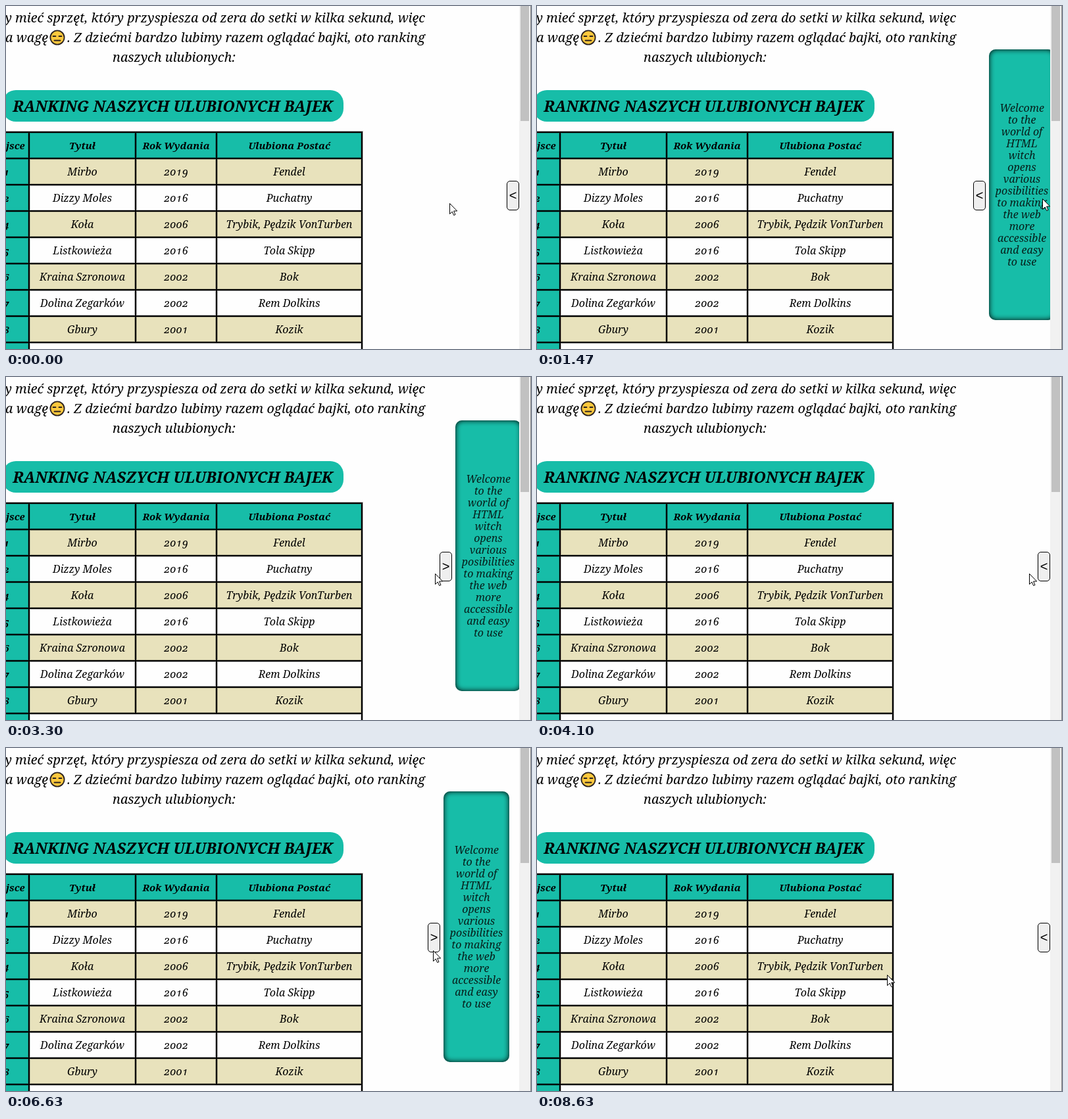
An HTML page that plays this animation: 798x522 px, repeating every 8700 ms.

```html
<!DOCTYPE html>
<html lang="pl">
<head>
<meta charset="utf-8">
<title>Ranking</title>
<style>
  html, body { margin: 0; width: 100%; height: 100%; overflow: hidden; background: #fefefe; }
  svg { display: block; width: 798px; height: 522px; }
  text { font: italic 16px "Noto Serif", serif; font-variant-numeric: oldstyle-nums; text-anchor: middle; }
  .intro { font-size: 19.8px; }
  .title { font-size: 23.4px; font-weight: 600; }
  .head { font-size: 14.9px; font-weight: 600; }
  .note { fill: #071f1b; }
  .sign { font: 20px "Liberation Sans", Arial, sans-serif; }
  .end { text-anchor: end; }
</style>
</head>
<body>
<svg viewBox="0 0 798 522">
  <defs>
    <clipPath id="panelShape"><rect width="100" height="412" rx="10"/></clipPath>
    <filter id="soft" x="-30%" y="-10%" width="160%" height="120%"><feGaussianBlur stdDeviation="4"/></filter>
  </defs>
  <rect width="798" height="522" fill="#fefefe"/>

  <text class="intro end" x="637" y="25">aby mieć sprzęt, który przyspiesza od zera do setki w kilka sekund, więc</text>
  <text class="intro end" x="64" y="55">a wagę</text>
  <g stroke="#2b2320" stroke-width="1.8" stroke-linecap="round">
    <circle cx="78" cy="48" r="10.6" fill="#ffc83d"/>
    <path d="M71.5 46h4M80.500 46h4M73.500 52.500h9" fill="none"/>
  </g>
  <text class="intro" x="365" y="55">. Z dziećmi bardzo lubimy razem oglądać bajki, oto ranking</text>
  <text class="intro" x="255.500" y="85">naszych ulubionych:</text>

  <rect x="-5" y="128" width="518" height="48" rx="20" fill="#17bda8"/>
  <text class="title" x="253.500" y="161">RANKING NASZYCH ULUBIONYCH BAJEK</text>

  <g id="table"></g>

  <g id="drawer">
    <g id="panel" transform="translate(24 66)" clip-path="url(#panelShape)">
      <rect width="100" height="412" fill="#17bda8"/>
      <rect x="-10" y="-10" width="120" height="432" rx="20" fill="none" stroke="#000" stroke-width="20" filter="url(#soft)"/>
    </g>
    <rect x=".5" y="266.500" width="18" height="44" rx="4.500" fill="#efefef" stroke="#000"/>
    <text id="sign" class="sign" x="9.500" y="295">&lt;</text>
  </g>

  <rect x="780" width="17" height="522" fill="#f1f1f1"/>
  <rect x="782" width="13" height="175" fill="#c1c1c1"/>
  <rect x="797" width="1" height="522" fill="#8a8a8a"/>

  <g id="pointer">
    <path d="M.5 .5V16.500L4.200 13L6.700 18.500L9 17.500L6.600 12H11.700Z" fill="#fff" stroke="#000"/>
    <circle id="press" r="12" fill="#ff0" fill-opacity=".47"/>
  </g>
</svg>
<script>
const LOOP = 8700, SLIDE = 500, SHUT_X = 761, TRAVEL = 120;
const PRESS_LEAD = 100, PRESS_HOLD = 130;
const TEAL = '#17bda8', BEIGE = '#e8e2bc', WHITE = '#fefefe';
const TOP = 192, ROW = 40;
const $ = id => document.getElementById(id);

function add(parent, tag, attrs, label = '') {
  const el = document.createElementNS('http://www.w3.org/2000/svg', tag);
  for (const key in attrs) el.setAttribute(key, attrs[key]);
  el.textContent = label;
  parent.appendChild(el);
}

const edges = [-34, 35, 197, 320, 541];
const rows = [
  'Miejsce|Tytuł|Rok Wydania|Ulubiona Postać',
  '1|Mirbo|2019|Fendel',
  '2|Dizzy Moles|2016|Puchatny',
  '4|Koła|2006|Trybik, Pędzik VonTurben',
  '5|Listkowieża|2016|Tola Skipp',
  '6|Kraina Szronowa|2002|Bok',
  '7|Dolina Zegarków|2002|Rem Dolkins',
  '8|Gbury|2001|Kozik',
  '|'
].map(row => row.split('|'));

let grid = '';
rows.forEach((row, r) => row.forEach((label, c) => {
  const y = TOP + ROW * r, left = edges[c];
  const right = c === row.length - 1 ? edges[4] : edges[c + 1];
  const heading = r === 0 || c === 0;
  const fill = heading ? TEAL : r % 2 ? BEIGE : WHITE;
  add($('table'), 'rect', { x: left, y, width: right - left, height: ROW, fill });
  add($('table'), 'text', { x: (left + right) / 2, y: y + 26, class: heading ? 'head' : '' }, label);
  grid += `M${left} ${y}H${right}V${y + ROW}H${left}Z`;
}));
add($('table'), 'path', { d: grid, fill: 'none', stroke: '#000', 'stroke-opacity': .25, 'stroke-width': 4 });
add($('table'), 'path', { d: grid, fill: 'none', stroke: '#000', 'stroke-width': 2 });

const note = 'Welcome|to the|world of|HTML|witch|opens|various|posibilities|' +
  'to making|the web|more|accessible|and easy|to use';
note.split('|').forEach((line, i) =>
  add($('panel'), 'text', { x: 50, y: 95 + 18 * i, class: 'note' }, line));

// The drawer opens and closes in turn
const toggles = [1112, 3175, 5467, 7860];
const home = { x: 674, y: 300 };
const moves = [
  { from: 40, to: 610, x: 768, y: 293 },
  { from: 2180, to: 3010, x: 652, y: 299 },
  { from: 3480, to: 4040, x: 748, y: 299 },
  { from: 4700, to: 4970, x: 758, y: 295 },
  { from: 5680, to: 6430, x: 649, y: 308 },
  { from: 8130, to: 8630, x: 532, y: 345 }
];

function swing(t, from, to) {
  const k = Math.min(1, Math.max(0, (t - from) / (to - from)));
  return .5 - Math.cos(Math.PI * k) / 2;
}

function pointerAt(t) {
  let { x, y } = home;
  for (const move of moves) {
    const k = swing(t, move.from, move.to);
    x += (move.x - x) * k;
    y += (move.y - y) * k;
  }
  return `${Math.round(x)} ${Math.round(y)}`;
}

function draw(t) {
  const open = toggles.reduce((sum, start, i) =>
    sum + (i % 2 ? -1 : 1) * swing(t, start, start + SLIDE), 0);
  const finished = toggles.filter(start => t >= start + SLIDE).length;
  const pressed = toggles.some(start => {
    const age = t - start + PRESS_LEAD;
    return age >= 0 && age < PRESS_HOLD;
  });
  $('drawer').setAttribute('transform', `translate(${Math.round(SHUT_X - TRAVEL * open)} 0)`);
  $('sign').textContent = finished % 2 ? '>' : '<';
  $('pointer').setAttribute('transform', `translate(${pointerAt(t)})`);
  $('press').setAttribute('visibility', pressed ? 'visible' : 'hidden');
}

const begin = performance.now();
function tick() {
  draw((performance.now() - begin) % LOOP);
  requestAnimationFrame(tick);
}
tick();
</script>
</body>
</html>
```
